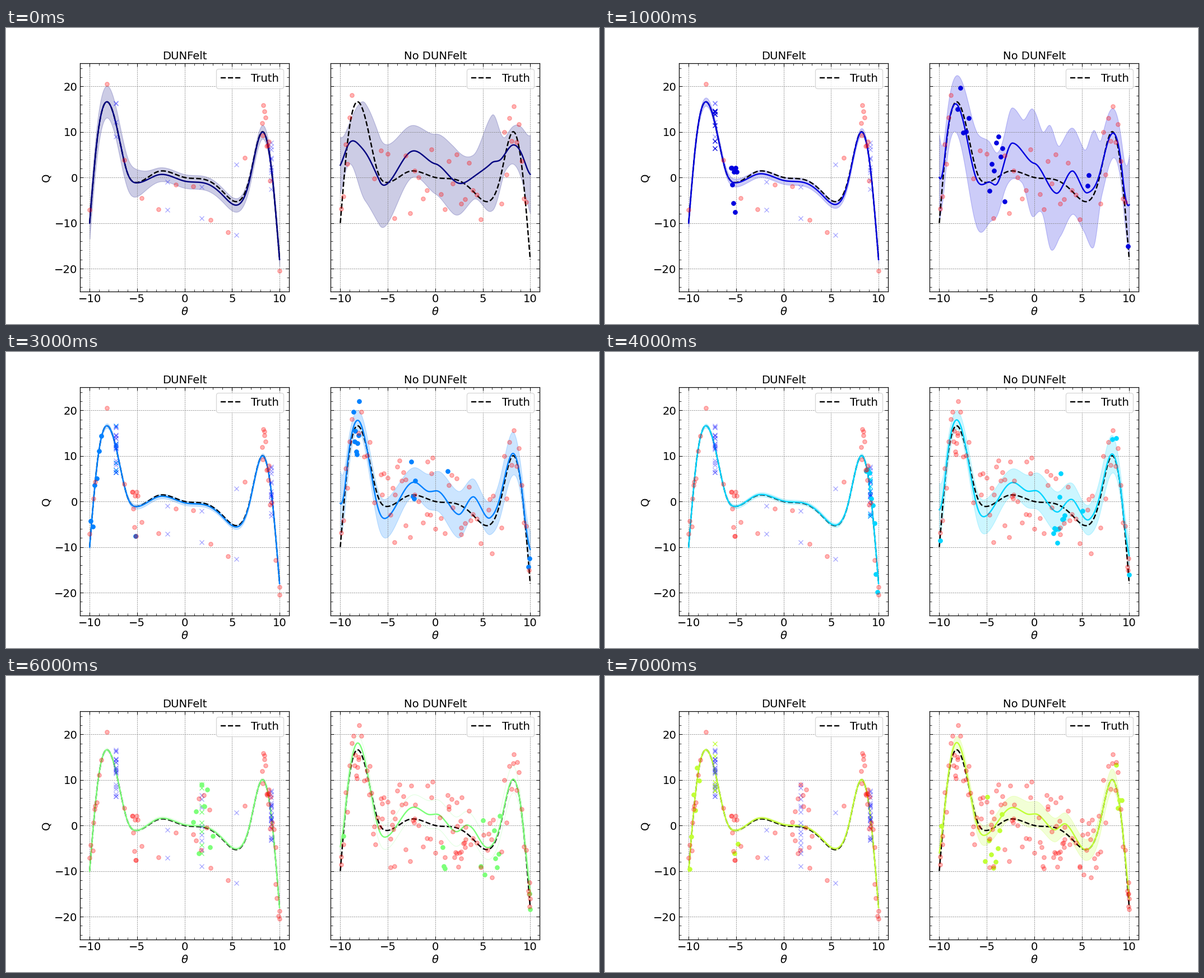
These frames come from a looping animation (1058 px wide and 529 px high, 8000 ms). A matplotlib script:

```python
import matplotlib.pyplot as plt
import numpy as np
from matplotlib.animation import FuncAnimation
from matplotlib.ticker import AutoMinorLocator, MultipleLocator

WIDTH, HEIGHT, DPI = 1058, 529, 92
STEPS = 8
METHOD = "DUNFelt"
LINE, MARKER = 1.92, 5.75
OUTLINE_ONLY = {6}  # steps whose band has no fill

plt.rcParams.update({
    "font.family": "DejaVu Sans", "font.size": 15.33,
    "axes.titlesize": 15.33, "axes.labelsize": 15.33,
    "axes.linewidth": 0.96, "legend.fontsize": 15.33,
    "xtick.direction": "in", "ytick.direction": "in",
    "xtick.top": True, "ytick.right": True,
    "xtick.major.size": 4.8, "ytick.major.size": 4.8,
    "xtick.minor.size": 2.9, "ytick.minor.size": 2.9,
})

theta = np.linspace(-10, 10, 400)


def spline(points):
    """Natural cubic spline through the points, sampled on theta."""
    knots, values = np.array(points, float).T
    n = len(knots)
    linear = np.column_stack([np.ones(n), knots])
    cubic = np.abs(knots[:, None] - knots) ** 3
    system = np.block([[cubic, linear], [linear.T, np.zeros((2, 2))]])
    weights = np.linalg.solve(system, np.r_[values, 0, 0])
    basis = np.abs(theta[:, None] - knots) ** 3
    return basis @ weights[:n] + weights[n] + weights[n + 1] * theta


def ease(*points):
    """Curve with the given turning points and steep open ends."""
    x, y = np.array(points, float).T
    last = len(x) - 2
    i = np.clip(np.searchsorted(x, theta, side="right") - 1, 0, last)
    t = (theta - x[i]) / (x[i + 1] - x[i])
    t = np.select([i == 0, i == last], [t * (2 - t), t * t], t * t * (3 - 2 * t))
    return y[i] + (y[i + 1] - y[i]) * t


truth = spline([
    (-10, -10), (-9.2, 8.4), (-8.2, 16.6), (-7.2, 11.6), (-6, 0.9),
    (-5.1, -1.1), (-2.8, 1.3), (0, 0), (2.5, -0.7), (4, -3.05), (5.4, -5.3),
    (6.8, -0.5), (8.15, 10), (9.2, 0.9), (10, -18)])

# Right panel: error of the mean and half width of the band at key steps
right_fits = {
    0: (ease((-10, 12.7), (-8, -9.3), (-5.9, -1), (-2.2, 4.4), (0, 3),
             (2.4, -0.6), (5.9, 8), (8.2, -2.9), (10, 18.7)),
        ease((-10, 6.2), (-9.3, 4.2), (-7.4, 10.7), (-2, 5.6), (1.8, 7.4),
             (4, 4.9), (6, 10.5), (7.4, 3.7), (10, 8.6))),
    1: (ease((-10, 10), (-9.4, 0.6), (-6.6, -2.2), (-4.8, 0), (-4, -1.4),
             (-2.3, 6.1), (0, 3.1), (2.3, -2.9), (4.2, 4.7), (5.6, 1.9),
             (8, -0.5), (9.3, 1.5), (10, 12)),
        ease((-10, 9.3), (-9.3, 5), (-5.8, 10.5), (-3.3, 6.2), (-2.4, 7.8),
             (-1.3, 7), (-0.2, 11.8), (0.8, 9), (1.7, 13.5), (2.7, 10),
             (5.2, 9), (6.2, 12.8), (7.1, 6.3), (9, 5), (10, 11))),
    3: (ease((-10, 9.6), (-9.4, 0.8), (-8.1, 1.2), (-5.6, -2.8), (-2.2, 2.8),
             (-0.8, 1.7), (0.2, 2.4), (2.4, -2.2), (4.2, 4.3), (5.8, 1.5),
             (9.3, 0.2), (10, 7.5)),
        ease((-10, 7), (-8.2, 2.2), (-5, 4.3), (-2.7, 3.2), (2.4, 5.1),
             (5, 3.4), (8, 4.8), (9.3, 3), (10, 4))),
    7: (ease((-10, 4), (-9.4, 0), (-8.1, 1.6), (-5.6, -1.2), (-2.2, 2.5),
             (-0.8, 2), (0.2, 2.6), (2.1, -0.5), (3.4, 2.1), (5.4, 0),
             (9.3, 0), (10, 2)),
        ease((-10, 2.5), (-8.2, 1.4), (-5, 2.2), (0, 2.8), (5, 2.3),
             (8, 2.5), (9.3, 1.5), (10, 2))),
}


def right_fit(step):
    before = max(key for key in right_fits if key <= step)
    after = min(key for key in right_fits if key >= step)
    mix = (step - before) / max(after - before, 1)
    error, half = ((1 - mix) * a + mix * b
                   for a, b in zip(right_fits[before], right_fits[after]))
    return truth + error, half


def logistic(x):
    return 1 / (1 + np.exp(-2 * x))


def left_fit(step):
    """Biased in the middle and unsure on the left, then quickly converging."""
    bias = np.interp(step, [0, 1, 3, 4, 7], [-0.8, -0.65, -0.3, 0.1, 0.2])
    width = np.interp(step, [0, 1, 3, 7], [1.5, 0.8, 0.5, 0.3])
    mean = truth + bias * logistic(theta + 4) * logistic(7 - theta)
    return mean, width + 2 * 0.05 ** step * logistic(-4.5 - theta)


# Samples per step: evenly filled ranges of theta as (low, high, count)
LEFT_RANGES = [
    [(-10, 10, 12), (8.2, 9, 8)],
    [(-5.55, -4.95, 8)],
    [(-9.6, -9.4, 2), (8.4, 10, 5)],
    [(-9.9, -8.8, 6), (-5.2, -5.2, 1)],
    [(8.7, 9.9, 8)],
    [(1.2, 2.6, 6)],
    [(0.9, 3, 8)],
    [(-9.9, -8.9, 6), (-5.2, -4.8, 2)],
]
RIGHT_RANGES = [
    [(-9.9, -8.8, 6), (-6.4, -4.3, 4), (-3.1, -0.4, 7), (0.6, 4.8, 11),
     (7, 9.6, 11)],
    [(-8.1, -6.9, 5), (-4.7, -3.1, 8), (5.6, 5.75, 2), (9.85, 9.85, 1)],
    [(-5.6, -5.4, 2), (-0.8, 0, 4), (1.7, 3.7, 3), (6, 6.1, 2)],
    [(-8.6, -8, 8), (-2.5, -2.1, 4), (1.3, 1.3, 1), (9.8, 9.9, 2)],
    [(2, 3.2, 10), (5.1, 5.1, 1), (8.2, 8.6, 2), (-9.9, 10, 2)],
    [(-7.2, -5.6, 8), (-4.7, -4.4, 3), (0.5, 3.2, 4), (5.5, 5.9, 2),
     (9.9, 9.9, 1)],
    [(0.8, 1, 3), (4.8, 5.2, 3), (6.2, 6.8, 5), (-9.7, -9.7, 1),
     (9.9, 10, 2)],
    [(-5.2, -3.4, 9), (-9.8, -9.8, 1), (8.6, 9.2, 4)],
]
SITES = np.array([-7.24, -1.8, 1.8, 5.45, 9.12])  # where cheap runs exist
rng = np.random.default_rng(5)


def observe(at, noise):
    spread = 5.5 * (1 - (at / 14) ** 2)
    return at, np.interp(at, theta, truth) + spread * noise


def sample(ranges):
    at = np.concatenate([np.linspace(*span) for span in ranges])
    return at, rng.uniform(-1.75, 1.75, len(at))


left_dots, crosses, right_dots = [], [], []
for left, right in zip(LEFT_RANGES, RIGHT_RANGES):
    at, noise = sample(left)
    nearest = SITES[np.abs(at[:, None] - SITES).argmin(axis=1)]
    left_dots.append(observe(at, noise))
    crosses.append(observe(nearest, noise))  # paired runs share their noise
    right_dots.append(observe(*sample(right)))

fig, (left_ax, right_ax) = plt.subplots(
    1, 2, figsize=(WIDTH / DPI, HEIGHT / DPI), dpi=DPI)


def style(ax, title):
    ax.clear()
    ax.set(xlim=(-11, 11), ylim=(-25, 25), title=title)
    ax.set_xlabel(r"$\theta$", labelpad=2.6)
    ax.xaxis.set_major_locator(MultipleLocator(5))
    ax.yaxis.set_major_locator(MultipleLocator(10))
    ax.xaxis.set_minor_locator(AutoMinorLocator(5))
    ax.yaxis.set_minor_locator(AutoMinorLocator(5))
    ax.grid(color="gray", ls="--", lw=0.55)


def draw_fit(ax, fit, step, color):
    mean, half = fit(step)
    band = ax.fill_between(theta, mean - half, mean + half, color=color, alpha=0.2)
    if step in OUTLINE_ONLY:
        band.set_facecolor("none")
    ax.plot(theta, truth, "k--", lw=LINE, label="Truth")
    ax.plot(theta, mean, color=color, lw=LINE)


def draw_samples(ax, samples, step, marker, color, old_color, old_alpha):
    if step:
        ax.plot(*samples[step], marker, color=color, ms=MARKER)
    for x, y in samples[:max(step, 1)]:
        ax.plot(x, y, marker, color=old_color, alpha=old_alpha, ms=MARKER)


def draw(step):
    color = plt.cm.jet(step / 12)
    style(left_ax, METHOD)
    style(right_ax, "No " + METHOD)
    left_ax.set_ylabel("Q")
    right_ax.tick_params(labelleft=False)
    draw_fit(left_ax, left_fit, step, color)
    draw_fit(right_ax, right_fit, step, color)
    draw_samples(left_ax, crosses, step, "x", color, "blue", 0.35)
    draw_samples(left_ax, left_dots, step, "o", color, "red", 0.3)
    draw_samples(right_ax, right_dots, step, "o", color, "red", 0.3)
    for ax in (left_ax, right_ax):
        ax.legend(loc="upper right")
    return []


animation = FuncAnimation(fig, draw, frames=STEPS, init_func=lambda: [],
                          interval=1000, repeat=True, repeat_delay=0)
plt.show()
```
